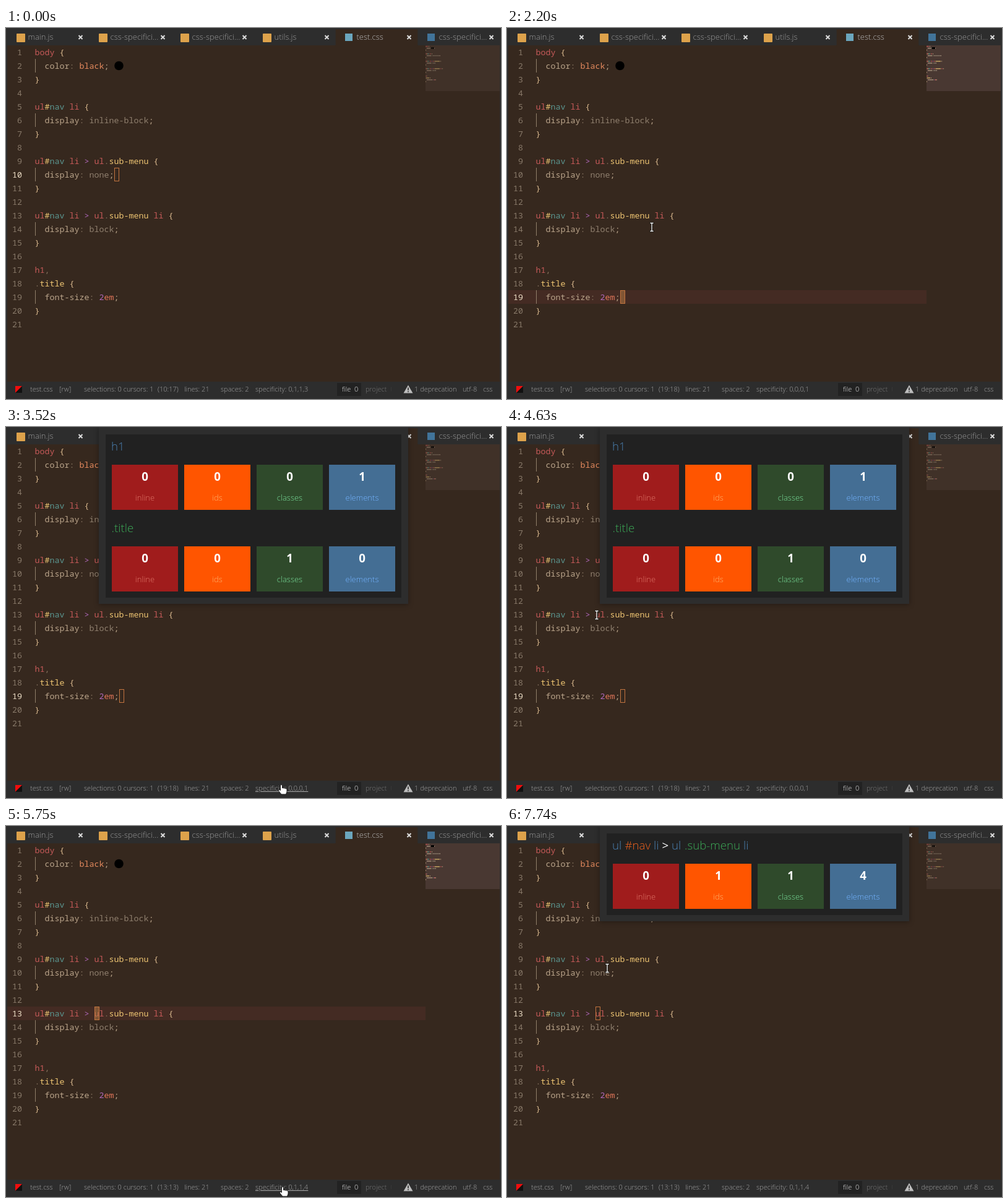
These frames come from a looping animation (800 px wide and 600 px high, 8 s). An HTML page:

```html
<!DOCTYPE html>
<html lang="en">
<head>
<meta charset="utf-8">
<title>Editor</title>
<style>
  html, body { margin: 0; width: 100%; height: 100%; overflow: hidden; background: #2d2d2d; }
  svg { display: block; width: 800px; height: 600px; }
  text { white-space: pre; font: 300 11px "Open Sans", sans-serif; fill: #a2a2a2; }
  .tab { font-size: 13px; fill: #999; }
  .tab.on { fill: #b9b9b9; }
  .code { font: 300 13.333px "Noto Sans Mono", monospace; }
  .num { fill: #877868; text-anchor: end; }
  .num.on { fill: #ebdcc4; }
  .r { fill: #c65a59; } .p { fill: #bba58b; } .b { fill: #d9b88e; } .g { fill: #85735f; }
  .o { fill: #e58a5e; } .v { fill: #8f7f6e; } .y { fill: #edc472; } .t { fill: #5b9690; }
  .m { fill: #b068bb; } .e { fill: #e2765a; }
  .popup { filter: drop-shadow(0 1px 4px rgba(0, 0, 0, .35)); }
  .title { font-size: 18.7px; }
  .id { fill: #f2621c; } .class { fill: #3ca956; } .element { fill: #4b82b4; } .op { fill: #fff; font-weight: 400; }
  .count { font-size: 18.7px; font-weight: 700; fill: #fff; text-anchor: middle; }
  .label { font-size: 13px; text-anchor: middle; }
</style>
</head>
<body>
<svg viewBox="0 0 800 600">
  <rect width="800" height="600" fill="#2d2d2d"/>
  <rect x="2" y="28" width="796" height="544" fill="#36281e"/>
  <rect x="532.700" y="2" width="132.600" height="27" fill="#36281e"/>
  <g id="tabs"></g>
  <rect id="rowGlow" x="2" width="676" height="22" fill="#442b23"/>
  <g id="lines"></g>
  <circle cx="182.5" cy="61" r="7.3"/>
  <rect id="caret" width="7" height="21" stroke="#c2743f"/>
  <rect id="mapBack" x="678" y="28" width="120" height="74"/>
  <g id="map"></g>
  <g id="status">
    <path d="M15 579h11v11h-11z" fill="#111"/>
    <path d="M15 590v-11h11z" fill="#f00d0d"/>
    <path d="M535 574h39v21h-39z" fill="#222"/>
    <path d="M650 577.500l7.500 13h-15z" fill="#bdbdbd"/>
    <path d="M650 581.500v4.500M650 587.300v1.700" stroke="#2d2d2d" stroke-width="1.600"/>
  </g>
  <linearGradient id="fade">
    <stop stop-color="#2d2d2d" stop-opacity="0"/><stop offset="1" stop-color="#2d2d2d"/>
  </linearGradient>
  <rect x="612" y="575" width="14" height="20" fill="url(#fade)"/>
  <rect x="623" y="575" width="14" height="20" fill="#2d2d2d"/>
  <g id="popups"></g>
  <g id="beam" fill="none" stroke-linecap="square">
    <path d="M-2-6.500H2M0-6V6M-2 6.500H2" stroke="#000" stroke-opacity=".75" stroke-width="3"/>
    <path d="M-2-6.500H2M0-6V6M-2 6.500H2" stroke="#fff" stroke-width="1.300"/>
  </g>
  <path id="hand" d="M-1.500 8V1.500Q0-.500 1.500 1.500V6Q3 4.800 4 6.300Q5.500 5.300 6.500 6.800Q8.500 6 9 8V12L7.500 16H0L-4.500 10.500Q-5 8.500-3 8.500L-1.500 10Z"
    fill="#fff" stroke="#111" stroke-width=".9"/>
</svg>
<script>
const $ = id => document.getElementById(id);
const ROW = 22, CHAR = 8, LEFT = 47, TOP = 28, STEP = 40, LOOP = 8000;
const add = (id, markup) => $(id).insertAdjacentHTML('beforeend', markup);
const esc = s => s.replace(/>/g, '&gt;');

// Tabs
['main.js', 'css-specifici...', 'css-specifici...', 'utils.js', 'test.css', 'css-specifici...'].forEach((name, i) => {
  const x = Math.round(17 + i * 132.7), active = i === 4;
  const icon = i < 4
    ? `<rect x="${x}" y="9" width="14" height="14" rx="1" fill="#dda24b"/>`
    : `<rect x="${x}" y="9" width="12" height="12" fill="${active ? '#6ba6bd' : '#41749a'}"/>`;
  add('tabs', `${icon}<text class="tab ${active ? 'on' : ''}" x="${x + 18.5}" y="19">${name}</text>
    <path d="M${x + 100.5} 12l6 6m0-6l-6 6" stroke="#dcdcdc" stroke-width="2"/>`);
});

// Code: tokens are split by "~", the first letter is the colour class
const ruleHead = 'rul~y#~tnav~r li';
const code = [
  'rbody~b {', 'p  color~g:~o black~p;', 'b}', '',
  ruleHead + '~b {', 'p  display~g:~v inline-block~p;', 'b}', '',
  ruleHead + '~m >~r ul~g.~ysub-menu~b {', 'p  display~g:~v none~p;', 'b}', '',
  ruleHead + '~m >~r ul~g.~ysub-menu~r li~b {', 'p  display~g:~v block~p;', 'b}', '',
  'rh1~g,', 'g.~ytitle~b {', 'p  font-size~g:~m 2~eem~p;', 'b}', ''
];
code.forEach((line, i) => {
  const top = TOP + i * ROW, base = top + 16;
  const tokens = line ? line.split('~').map(s => [s[0], s.slice(1)]) : [];
  let col = 0;
  add('lines', `<text class="code num" x="26" y="${base}">${i + 1}</text>
    <text class="code" x="${LEFT - 0.5}" y="${base}">${tokens.map(([c, s]) => `<tspan class="${c}">${esc(s)}</tspan>`).join('')}</text>`);
  if (line.startsWith('p  ')) add('lines', `<path d="M47.500 ${top}v${ROW}" stroke="#917f6a"/>`);
  for (const [kind, s] of tokens) {
    for (const word of s.matchAll(/\S+/g)) {
      add('map', `<rect class="${kind}" x="${678 + col + word.index}" y="${29 + i * 3}" width="${word[0].length}" height="1.500" opacity=".75"/>`);
    }
    col += s.length;
  }
});
add('map', '<rect x="687" y="31" width="5" height="3"/>');
const numbers = [...document.querySelectorAll('.num')];

// Status bar
const status = (x, s, extra = '') => add('status', `<text x="${x}" y="588" ${extra}>${s}</text>`);
[[39, 'test.css'], [86, '[rw]'], [126, 'selections: 0 cursors: 1'], [288, 'lines: 21'], [347, 'spaces: 2'],
 [660, '1 deprecation'], [738, 'utf-8'], [771, 'css']].forEach(([x, s]) => status(x, s));
status(245, '', 'id="position"');
status(403, '', 'id="specificity"');
status(543, 'file&#160; 0', 'style="fill:#e2e2e2"');
status(581, 'project&#160; 0', 'style="fill:#777"');

// Specificity panels
const boxes = [['inline', '#a01c1c', '#df7669'], ['ids', '#ff5500', '#ffb46e'],
  ['classes', '#2f4a2b', '#7be29d'], ['elements', '#446e94', '#74b3ff']];
function panel(rows) {
  const body = rows.map(([words, counts], r) => {
    const y = 12 + r * 132;
    const title = words.map(([x, kind, s]) => `<tspan class="${kind}" x="${x}">${esc(s)}</tspan>`).join('');
    return `<text class="title" y="${y + 26}">${title}</text>` + boxes.map(([label, back, ink], i) => {
      const x = 171 + i * 117;
      return `<rect x="${x}" y="${y + 49}" width="107" height="73" fill="${back}"/>
        <text class="count" x="${x + 53.5}" y="${y + 75}">${counts[i]}</text>
        <text class="label" x="${x + 53.5}" y="${y + 107}" style="fill:${ink}">${label}</text>`;
    }).join('');
  }).join('');
  const h = rows.length * 132;
  add('popups', `<g class="popup"><rect x="150" width="500" height="${h + 22}" fill="#2d2d2d"/>
    <rect x="161" y="12" width="478" height="${h}" fill="#212121"/>${body}</g>`);
}
panel([[[[170, 'element', 'h1']], [0, 0, 0, 1]], [[[170.5, 'class', '.title']], [0, 0, 1, 0]]]);
panel([[[[170, 'element', 'ul'], [190.5, 'id', '#nav'], [237, 'element', 'li'], [250.5, 'op', '>'],
  [266, 'element', 'ul'], [287, 'class', '.sub-menu'], [382, 'element', 'li']], [0, 1, 1, 4]]]);
const popups = [...$('popups').children];

// Timeline
const states = [
  { at: 0, line: 10, col: 17, spec: '0,1,1,3', focus: 0, popup: -1 },
  { at: 1820, line: 19, col: 18, spec: '0,0,0,1', focus: 1, popup: -1 },
  { at: 3400, line: 19, col: 18, spec: '0,0,0,1', focus: 0, popup: 0 },
  { at: 4830, line: 13, col: 13, spec: '0,1,1,4', focus: 1, popup: -1 },
  { at: 6240, line: 13, col: 13, spec: '0,1,1,4', focus: 0, popup: 1 }
];
// Pointer moves: start, end, way points
const moves = [
  [330, 690, [800, 40], [273, 369]],
  [1170, 1410, [273, 369], [288, 458], [298, 433]],
  [1570, 1610, [298, 433], [305, 440]],
  [2080, 2200, [305, 440], [234, 322]],
  [2350, 2550, [234, 322], [265, 438]],
  [2550, 2550, [-50, -50], [-50, -50]],
  [2850, 2850, [442, 586], [442, 586]],
  [3020, 3060, [442, 586], [445, 578]],
  [3910, 4630, [445, 578], [145, 303.5]],
  [5080, 5750, [145, 303.5], [320, 430], [512, 566], [447, 583]],
  [6700, 7500, [447, 583], [206, 300]],
  [7540, 7740, [206, 300], [162, 230]]
];
const last = (list, test) => list.filter(test).pop();
const smooth = u => u * u * u * (u * (6 * u - 15) + 10);

function pointerAt(t) {
  const move = last(moves, m => m[0] <= t);
  if (!move) return [-50, -50];
  const [start, end, ...points] = move;
  const steps = Math.round((end - start) / STEP);
  const u = smooth(Math.min(1, (Math.floor((t - start) / STEP) + 1) / (steps + 1))) * (points.length - 1);
  const i = Math.min(Math.floor(u), points.length - 2);
  return [0, 1].map(k => points[i][k] + (points[i + 1][k] - points[i][k]) * (u - i));
}

const set = (id, attrs) => Object.entries(attrs).forEach(([k, v]) => $(id).setAttribute(k, v));
const mix = (a, b, u) => `rgb(${a.map((v, i) => Math.round(v + (b[i] - v) * u))})`;

function draw() {
  const t = performance.now() % LOOP;
  const s = last(states, v => v.at <= t);
  const top = TOP + (s.line - 1) * ROW;
  const faded = Math.min(1, (Math.floor((t - s.at) / STEP) + 1) / 4);
  const glow = s.at === 0 ? 0 : s.focus ? faded : 1 - faded;

  set('rowGlow', { y: top, opacity: s.focus });
  set('caret', { x: LEFT + (s.col - 1) * CHAR + 0.5, y: top + 0.5, fill: s.focus ? 'rgba(190,128,70,.5)' : 'none' });
  set('mapBack', { fill: mix([64, 49, 40], [73, 56, 50], glow) });
  set('map', { opacity: 0.6 + 0.4 * glow });
  numbers.forEach((n, i) => n.classList.toggle('on', i + 1 === s.line));
  popups.forEach((p, i) => p.setAttribute('visibility', i === s.popup ? 'visible' : 'hidden'));
  $('position').textContent = `(${s.line}:${s.col})`;
  $('specificity').textContent = `specificity: ${s.spec}`;

  const [x, y] = pointerAt(t).map(Math.round);
  const hover = y >= 573 && x >= 403 && x <= 485;
  set('specificity', { 'text-decoration': hover ? 'underline' : 'none' });
  set('beam', { transform: `translate(${x} ${y})`, visibility: hover ? 'hidden' : 'visible' });
  set('hand', { transform: `translate(${x} ${y})`, visibility: hover ? 'visible' : 'hidden' });
  requestAnimationFrame(draw);
}
draw();
</script>
</body>
</html>
```
